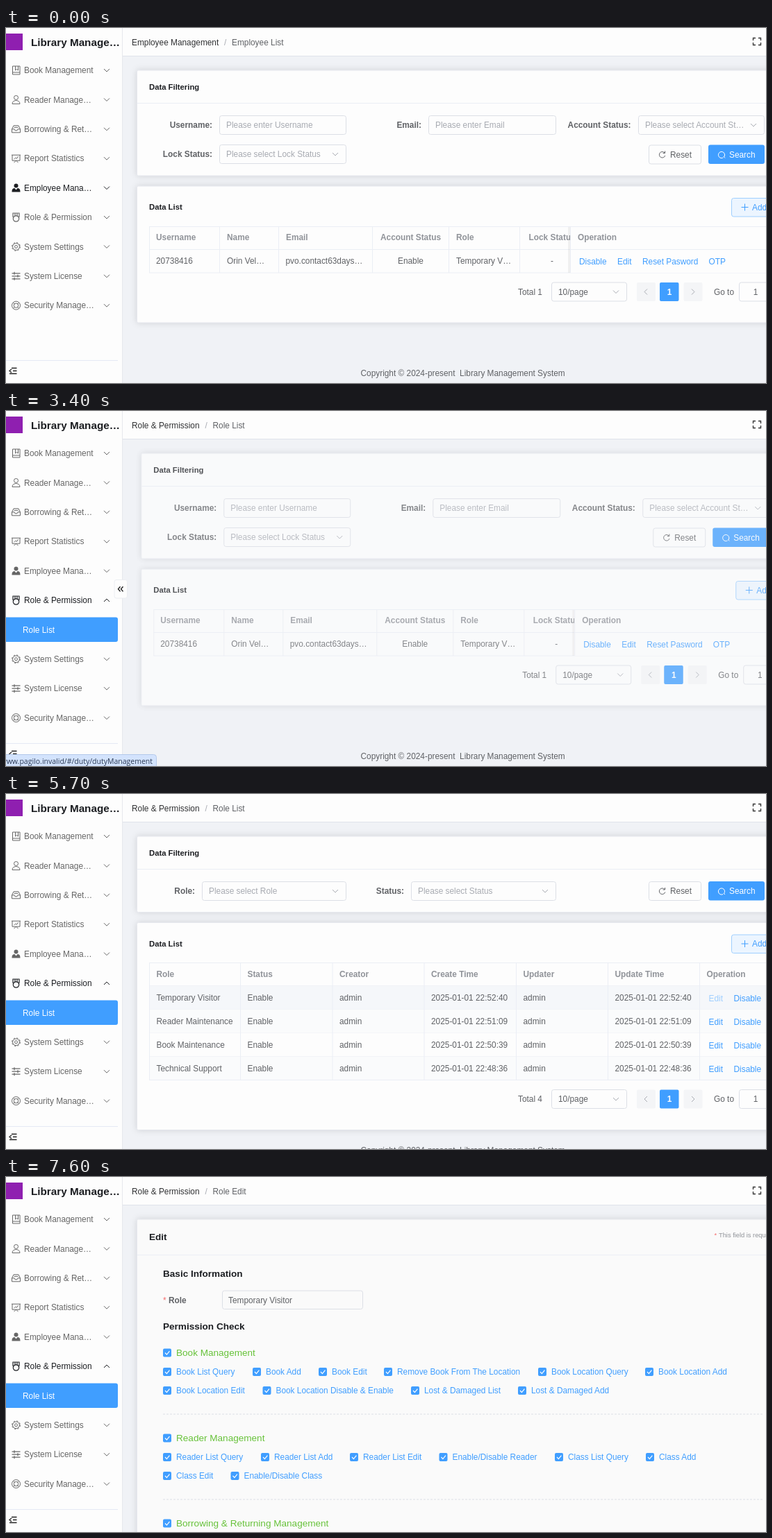
These frames come from a looping animation (1094x512 px, 8 s). An HTML page:

```html
<!DOCTYPE html>
<html lang="en">
<head>
<meta charset="utf-8">
<title>Library admin</title>
<style>
  html, body { margin: 0; width: 100%; height: 100%; overflow: hidden; background: #f0f2f6; }
  svg { display: block; font: 11.87px "Liberation Sans", Arial, sans-serif; }
  text { white-space: pre; }
  .card { filter: drop-shadow(0 0 5px rgba(0, 0, 0, .13)); }
</style>
</head>
<body>
<svg id="stage" width="1094" height="512" viewBox="0 0 1094 512"></svg>
<script>
const BLUE = '#409eff', GRAY = '#606266', MUTED = '#909399', HINT = '#a8abb2', DARK = '#1c1e22',
      LINE = '#ebeef5', BORDER = '#dcdfe6', PAPER = '#fdfdfd', PALE = '#9fcfff';
const BOLD = 'font-weight="700" ', END = 'text-anchor="end" ', MID = 'text-anchor="middle" ';
const size = n => `font-size="${n}" `;

// Drawing helpers; text is placed by its vertical centre.
const text = (x, y, s, fill = GRAY, attrs = '') =>
  `<text x="${x}" y="${y}" dy=".355em" fill="${fill}" ${attrs}>${s.replace(/&/g, '&amp;')}</text>`;
const rect = (x, y, w, h, fill, stroke = 'none', r = 0, attrs = '') =>
  `<rect x="${x}" y="${y}" width="${w}" height="${h}" fill="${fill}" stroke="${stroke}" rx="${r}" ${attrs}/>`;
const path = (d, stroke, width = 1, attrs = '') =>
  `<path d="${d}" fill="none" stroke="${stroke}" stroke-width="${width}" ${attrs}/>`;
const circle = (x, y, r, attrs = '') => `<circle cx="${x}" cy="${y}" r="${r}" ${attrs}/>`;
const group = (x, y, body, opacity = 1) =>
  opacity > 0 ? `<g transform="translate(${x} ${y})" opacity="${opacity}">${body}</g>` : '';
const hline = (x, y, x2, color = LINE) => path(`M${x} ${y}H${x2}`, color);
const vline = (x, y, y2, color = LINE) => path(`M${x} ${y}V${y2}`, color);
const chevron = (x, y, color = HINT, flip = 1) =>
  path(`M${x - 4} ${y - 2 * flip}l4 ${4 * flip} 4 ${-4 * flip}`, color);

// Linear interpolation through time/value pairs.
function track(t, ...keys) {
  if (t <= keys[0]) return keys[1];
  for (let i = 2; i < keys.length; i += 2)
    if (t <= keys[i]) {
      const k = (t - keys[i - 2]) / (keys[i] - keys[i - 2]);
      return keys[i - 1] + k * (keys[i + 1] - keys[i - 1]);
    }
  return keys[keys.length - 1];
}

// Interface parts
const card = (y, bottom) => rect(188.5, y, 925, bottom - y, PAPER, '#e6e8ee', 2, 'class="card"');
const title = (y, s) => text(206, y, s, DARK, BOLD + size(11.3));
const label = (x, y, s) => text(x, y, s, GRAY, BOLD + END);
const input = (x, y, w, s, fill = HINT) =>
  rect(x + .5, y + .5, w, 27, PAPER, BORDER, 3) + text(x + 10, y + 14, s, fill);
const select = (x, y, w, s, fill) => input(x, y, w, s, fill) + chevron(x + w - 15, y + 14);
const buttons = y =>
  rect(925.5, y + .5, 75, 27, PAPER, BORDER, 3) +
  path(`M948 ${y + 11.5}a4.3 4.3 0 1 0 .8 4M948.6 ${y + 9}v3h-3`, GRAY) + text(956, y + 14, 'Reset') +
  rect(1011, y, 81, 27.5, BLUE, 'none', 3) +
  path(`M1033.5 ${y + 17.5}a4.6 4.6 0 1 0 -1.2 1M1033 ${y + 17}l2 2`, '#fff') +
  text(1041, y + 14, 'Search', '#fff');
const addButton = y => rect(1044.5, y + .5, 65, 26.5, '#ecf5ff', PALE, 3) +
  path(`M1058.5 ${y + 13.5}h10m-5 -5v10`, BLUE) + text(1074, y + 13.5, 'Add', BLUE);
const pager = (y, total) =>
  text(737, y, 'Total ' + total) + select(785, y - 14, 108, '10/page', GRAY) +
  rect(908, y - 13.5, 27, 27, '#f4f5f7', 'none', 2) + path(`M923 ${y - 4}l-4 4 4 4`, HINT) +
  rect(941, y - 13.5, 27.5, 27, BLUE, 'none', 2) + text(955, y, '1', '#fff', BOLD + MID) +
  rect(975.5, y - 13.5, 27, 27, '#f4f5f7', 'none', 2) + path(`M987 ${y - 4}l4 4 -4 4`, HINT) +
  text(1019, y, 'Go to') + rect(1055.5, y - 13.5, 47, 27, PAPER, BORDER, 3) + text(1079, y, '1', GRAY, MID);

function employeePage() {
  const heads = [[216, 'Username'], [318, 'Name'], [403, 'Email'], [539, 'Account Status'],
                 [648, 'Role'], [752.5, 'Lock Status']];
  const cells = [[216, '20738416'], [318, 'Orin Vel…'], [402.5, 'pvo.contact63days…'],
                 [564, 'Enable'], [648, 'Temporary V…'], [784, '-']];
  const links = [[825, 'Disable'], [880, 'Edit'], [916, 'Reset Pasword'], [1011.5, 'OTP']];
  return card(61, 213) + title(84.5, 'Data Filtering') + hline(189, 108.5, 1094) +
    label(297, 140, 'Username:') + input(307, 126, 182, 'Please enter Username') +
    label(598, 140, 'Email:') + input(608, 126, 183, 'Please enter Email') +
    label(899.5, 140, 'Account Status:') + select(910, 126, 181, 'Please select Account St…') +
    label(297, 182, 'Lock Status:') + select(307, 168, 182, 'Please select Lock Status') + buttons(168.5) +
    card(228, 425) + title(258, 'Data List') + addButton(245) +
    rect(206.5, 286.5, 900, 66.5, PAPER, LINE) + hline(206, 319.5, 1094) +
    [307.5, 392.5, 527.5, 637.5, 739.5].map(x => vline(x, 286, 353)).join('') +
    heads.map(([x, s]) => text(x, 302, s, MUTED, BOLD)).join('') +
    cells.map(([x, s]) => text(x, 336, s)).join('') +
    rect(809, 287, 3, 66, 'rgba(0,0,0,.05)') + rect(812, 287, 290, 66, PAPER) +
    hline(812, 319.5, 1094) + vline(812.5, 287, 353) + text(823, 302, 'Operation', MUTED, BOLD) +
    links.map(([x, s]) => text(x, 337, s, BLUE)).join('') + pager(380.5, 1);
}

const COLUMNS = [206.5, 337.5, 470, 602, 734.5, 866.5, 998.5];
const HEADS = ['Role', 'Status', 'Creator', 'Create Time', 'Updater', 'Update Time', 'Operation'];
const ROLES = [['Temporary Visitor', '52:40'], ['Reader Maintenance', '51:09'],
               ['Book Maintenance', '50:39'], ['Technical Support', '48:36']];

function rolePage(t) {
  const loaded = t >= 4300, shift = loaded ? 85 : 0, bottom = loaded ? 412.5 : 327.5;
  const spinY = loaded ? 346 : 318;
  const rowFill = i => i === 0 && t >= 4700 ? '#f5f7fa' : i % 2 ? '#fafbfc' : PAPER;
  const row = ([name, time], i) => {
    const y = 293.5 + 34 * i, date = '2025-01-01 22:' + time;
    return rect(207, y - 17, 890, 34, rowFill(i)) + hline(206, y + 17, 1094) +
      [name, 'Enable', 'admin', date, 'admin', date].map((s, c) => text(COLUMNS[c] + 10, y, s)).join('') +
      text(1011.5, y + 1, 'Edit', i === 0 && t >= 5600 ? PALE : BLUE) +
      text(1047.5, y + 1, 'Disable', i === 0 && t >= 5300 && t < 5600 ? PALE : BLUE);
  };
  const body = loaded ? ROLES.map(row).join('') : text(657, 303, 'No Data', MUTED, MID) + hline(206, bottom, 1094);
  const loading = path('M-8 3A8.5 8.5 0 0 1 -2 -8', BLUE, 1.6, `transform="rotate(${t * .36 % 360})"`);
  return card(61, 170.5) + title(84.5, 'Data Filtering') + hline(189, 108.5, 1094) +
    label(272, 140, 'Role:') + select(282, 126, 207, 'Please select Role') +
    label(573, 140, 'Status:') + select(583, 126, 208, 'Please select Status') + buttons(126) +
    card(185.5, 399.5 + shift) + title(215.5, 'Data List') + addButton(202.5) +
    hline(206, 243.5, 1094) + hline(206, 276.5, 1094) + body +
    COLUMNS.map((x, i) => vline(x, 243, i && !loaded ? 276 : bottom) +
      text(x + 10, 259.5, HEADS[i], MUTED, BOLD)).join('') +
    pager(355 + shift, loaded ? 4 : 0) +
    group(655, spinY, loading + text(0, loaded ? 37 : 23, 'Loading the first page…', BLUE, MID),
      track(t, 4200, 1, 4500, .15, 4700, 0));
}

const checkbox = (x, y) => rect(x, y - 6, 12, 12, BLUE, 'none', 2) + path(`M${x + 3} ${y}l2.4 2.6 4 -5`, '#fff', 1.2);
const check = (x, y, s) => checkbox(x, y) + text(x + 19, y, s, BLUE);
const PERMISSIONS = [
  ['Book Management',
    [[226, 'Book List Query'], [355, 'Book Add'], [450, 'Book Edit'], [544, 'Remove Book From The Location'],
     [766, 'Book Location Query'], [920, 'Book Location Add']],
    [[226, 'Book Location Edit'], [369.5, 'Book Location Disable & Enable'], [583, 'Lost & Damaged List'],
     [737, 'Lost & Damaged Add']]],
  ['Reader Management',
    [[226, 'Reader List Query'], [367, 'Reader List Add'], [495, 'Reader List Edit'],
     [623.5, 'Enable/Disable Reader'], [790, 'Class List Query'], [921, 'Class Add']],
    [[226, 'Class Edit'], [323.5, 'Enable/Disable Class']]],
  ['Borrowing & Returning Management']
];

function editPage(loaded) {
  const heading = (x, y, s) => text(x, y, s, DARK, BOLD + size(13.57));
  const section = ([name, ...rows], i) => {
    const y = 253.5 + 123 * i;
    return checkbox(226, y) + text(245, y, name, '#67c23a', size(13.57)) +
      rows.map((items, r) => items.map(([x, s]) => check(x, y + 27.5 + 27 * r, s)).join('')).join('') +
      path(`M226 ${y + 88.5}H1090`, BORDER, 1, 'stroke-dasharray="3 2"');
  };
  const formButtons = rect(591, 240, 68, 27, PAPER, BORDER, 3) + text(625, 254, 'Cancel', GRAY, MID) +
    rect(689, 240, 69, 27, BLUE, 'none', 3) + text(723, 254, 'Submit', '#fff', MID);
  return rect(188.5, 61, 925, loaded ? 700 : 430, '#fafafa', '#e6e8ee', 2, 'class="card"') +
    heading(206, 86, 'Edit') + hline(189, 112.5, 1094) +
    text(1019.5, 84, '*', '#f56c6c', size(9.3)) + text(1026, 83.5, 'This field is required', MUTED, size(9.3)) +
    heading(226, 139.5, 'Basic Information') + text(226, 178, '*', '#f56c6c') + text(234, 177.5, 'Role', GRAY, BOLD) +
    rect(311.5, 164, 202, 26.5, '#fafafa', BORDER, 3) + (loaded ? text(320, 177.5, 'Temporary Visitor') : '') +
    heading(226, 215.5, 'Permission Check') + (loaded ? PERMISSIONS.map(section).join('') : formButtons);
}

// Sidebar: label and icon drawn around its own centre
const person = 'M-6 6C-6 1 -4 .5 -2 .5L0 3 2 .5C4 .5 6 1 6 6z';
const MENU = [
  ['Book Management', c => path('M-5 -6H5.5V6H-5zM-5 3H5.5M-1 -6V0L1 -1.5 3 0V-6', c)],
  ['Reader Manage…', c => path('M-5.5 6C-5.5 -.5 5.5 -.5 5.5 6z', c) + circle(0, -3, 3, `fill="${PAPER}" stroke="${c}"`)],
  ['Borrowing & Ret…', c => path('M-6 0L-3.5 -5H3.5L6 0V5H-6zM-6 0H-2.5L-1.5 2H1.5L2.5 0H6M-3 -2.5H3', c)],
  ['Report Statistics', c => path('M-6.5 -5H6.5M-5.5 -5V3H5.5V-5M-3 6L0 3 3 6M-3 1L-1 -1 1 0 3 -3', c)],
  ['Employee Mana…', c => `<path d="${person}" fill="${c}"/>` + circle(0, -3, 3, `fill="${c}"`)],
  ['Role & Permission', c => path('M-4.5 0V-6H4.5V0M-1.5 -6V-2M1.5 -6V-2', c, 1.2) + circle(0, 2, 4.2, `fill="none" stroke="${c}" stroke-width="1.2"`)],
  ['System Settings', c => `<g fill="none" stroke="${c}">` + circle(0, 0, 4.9) + circle(0, 0, 2) +
    circle(0, 0, 5.9, 'stroke-dasharray="2.3 2.33"') + '</g>'],
  ['System License', c => path('M-6 -4H6M-6 0H6M-6 4H6M-2.5 -6V-2M2.5 -2V2M-2.5 2V6', c, 1.2)],
  ['Security Manage…', c => `<g fill="none" stroke="${c}">` + circle(0, 0, 6) + circle(0, 0, 3.2) + '</g>' +
    path('M-4 -4L-2 -2M4 -4L2 -2M-4 4L-2 2M4 4L2 2', c)]
];

function sidebar(t) {
  const within = (a, b) => t >= a && t < b;
  const open = track(t, 1800, 0, 2200, 1), chosen = t >= 3400;
  const tone = i => {
    if (i === 4) return chosen ? '#666' : DARK;
    if (i === 5) return chosen || within(800, 1900) ? DARK : '#666';
    if (i === 6) return within(1100, 1700) || within(2000, 2800) ? DARK : within(2800, 3100) ? '#444' : '#666';
    return '#666';
  };
  const item = ([name, icon], i) => group(0, 61 + 42.4 * i + (i > 5 ? 42.4 * open : 0),
    group(14.5, 0, icon(tone(i))) + text(26, 0, name, tone(i)) +
    chevron(145, 0, tone(i), i === 5 ? 1 - 2 * open : 1));
  const roleList = (chosen ? rect(-4, 297.5, 165, 35.5, BLUE, 'none', 3) : '') +
    text(24, 315.5, 'Role List', chosen ? '#fff' : '#444');
  return rect(0, 0, 167, 512, PAPER) + vline(167.5, 0, 512, '#e6e8ed') +
    rect(0, 8, 24, 24, '#8f1fb0') + text(36, 20.5, 'Library Manage…', DARK, BOLD + size(15.26)) +
    group(0, 0, roleList, open) + MENU.map(item).join('') + hline(0, 479.5, 161, '#e4e9f4') +
    path('M8 490.5H15.5M10 494.5H15.5M5 498.5H15.5M8 492L5 494.5 8 497', '#222', 1.3);
}

function header(t) {
  const [section, page] = t < 3400 ? ['Employee Management', 'Employee List']
    : ['Role & Permission', t < 6400 ? 'Role List' : 'Role Edit'];
  const x = t < 3400 ? 314 : 286.5;
  return rect(167, 0, 927, 40, PAPER) + hline(167, 40.5, 1094, '#e0e3ea') +
    text(181, 20.5, section, '#303133') + text(x, 20.5, '/', HINT) + text(x + 11, 20.5, page) +
    path('M1075.5 18V14.5H1079M1083 14.5H1086.5V18M1086.5 21V24.5H1083M1079 24.5H1075.5V21', '#333', 1.3) +
    (t >= 4200 && t < 4700 ? rect(167, 0, track(t, 4200, 400, 4500, 703, 4600, 927), 1.5, BLUE) : '');
}

function scene(t) {
  const out1 = track(t, 3300, 0, 3700, 1), out2 = track(t, 6300, 0, 6900, 1);
  const in2 = track(t, 3700, 0, 3800, .2, 4000, .5, 4200, .5, 4500, .8, 4600, .8, 4800, 1);
  const in3 = track(t, 6900, 0, 7000, .03, 7200, .3, 7300, .5, 7600, 1);
  const footerY = t >= 7300 ? 900 : t >= 4300 && t < 6900 ? 513.5 : 497.5;
  const hint = rect(-4, 495.5, 220.5, 20, '#d3e3fd', '#b4c9ea', 4) +
    text(211, 505, 'www.pagilo.invalid/#/duty/dutyManagement', '#2b3a55',
      END + size(10.5) + 'font-family="Open Sans, sans-serif"');
  const foldTab = rect(156, 243.5, 18.5, 26.5, PAPER, '#eceef2', 3) +
    path('M164.5 253.2l-3 3.6 3 3.6M168.5 253.2l-3 3.6 3 3.6', '#222', 1.4);
  return rect(0, 0, 1094, 512, '#f0f2f6') +
    text(510.5, footerY, 'Copyright © 2024-present  Library Management System') +
    (t < 3700 ? group(25 * out1, 0, employeePage(), 1 - out1) : '') +
    (t >= 3700 && t < 6900 ? group(25 * (in2 - 1 + out2), 0, rolePage(t), in2 - out2) : '') +
    (t >= 7000 ? group(25 * (in3 - 1), 0, editPage(t >= 7300), in3) : '') +
    header(t) + sidebar(t) +
    (t >= 500 && t < 4200 ? foldTab : '') + (t >= 2100 && t < 4200 ? hint : '');
}

const stage = document.getElementById('stage');
let shown = -1;
function tick() {
  const t = Math.floor(performance.now() % 8000 / 100) * 100;
  if (t !== shown) stage.innerHTML = scene(shown = t);
  requestAnimationFrame(tick);
}
tick();
</script>
</body>
</html>
```
